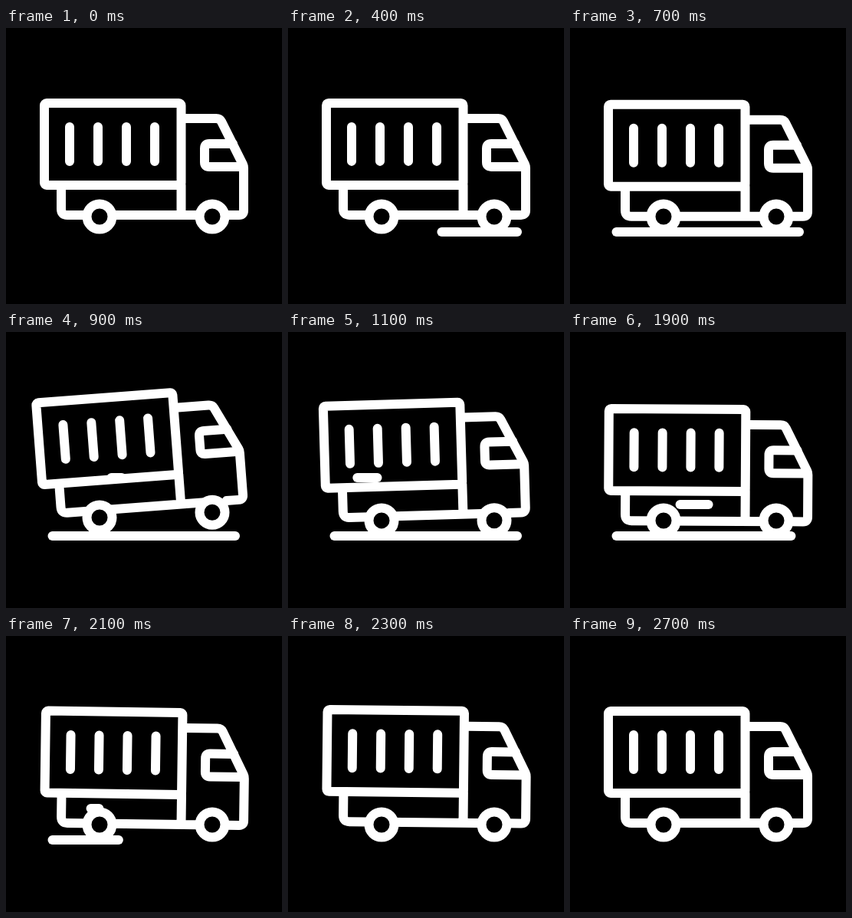
Write an HTML page that moves like this. It is 360x360 px and loops after 3 s.

```html
<!DOCTYPE html>
<html lang="en">
<head>
<meta charset="utf-8">
<title>Delivery truck</title>
<style>
  html, body { margin: 0; width: 100%; height: 100%; overflow: hidden; background: #000; }
  svg { display: block; width: 100vw; height: 100vh; }
  rect, path, circle, line {
    fill: none; stroke: #fff; stroke-width: 12;
    stroke-linecap: round; stroke-linejoin: round;
  }
  circle { fill: #000; }
</style>
</head>
<body>
<svg viewBox="0 0 360 360">
  <line id="road" y1="266" y2="266"/>
  <g id="winds"></g>
  <g id="body">
    <rect x="50" y="98" width="178.5" height="107" rx="3"/>
    <path d="M83 129V174M120 129V174M157 129V174M194 129V174"/>
    <path d="M72 208V236Q72 244 80 244H269M228.5 205V244"/>
    <path d="M231 118H274Q279 118 281 122L309 178Q310 180 310 183V238Q310 244 304 244H288"/>
    <path d="M296 151H265Q259 151 259 157V175Q259 181 265 181H309"/>
  </g>
  <circle id="rear" cx="122" cy="246" r="16.5"/>
  <circle id="front" cx="269" cy="246" r="16.5"/>
</svg>
<script>
const LOOP = 3000, STEP = 100, LAST = 2700;
const WIND_TIME = 640, WIND_LAG = 104;
const $ = id => document.getElementById(id);

const winds = [
  { y: 190, from: 155, reach: 90, start: 700 },
  { y: 135, from: 311, reach: 130, start: 1150 },
  { y: 225, from: 240, reach: 130, start: 1490 }
];

const clamp = p => Math.min(1, Math.max(0, p));
const ease = p => p < 0.5 ? 2 * p * p : 1 - 2 * (1 - p) * (1 - p);
const travel = (t, start, time) => ease(clamp((t - start) / time));
// Rises from 0 to 1 and falls back to 0.
const pulse = (t, start, end) => Math.sin(Math.PI * clamp((t - start) / (end - start))) ** 2;

for (const wind of winds) {
  wind.el = document.createElementNS("http://www.w3.org/2000/svg", "line");
  wind.el.setAttribute("y1", wind.y);
  wind.el.setAttribute("y2", wind.y);
  $("winds").append(wind.el);
}

// Shows the part of a line between its leading and trailing end.
function trim(el, from, reach, head, tail) {
  el.setAttribute("x1", from - reach * tail);
  el.setAttribute("x2", from - reach * head);
  el.style.display = head - tail > 0.001 ? "" : "none";
}

function draw(t) {
  const engine = clamp(Math.min(t, LAST - t) / 300);
  const shake = engine * (0.5 + 2 * Math.cos(2 * Math.PI * (t / 667 + 0.1)));
  const hop = pulse(t, 700, 1200);
  const tilt = 0.8 * pulse(t, 1700, 2600) - 4.8 * hop;
  $("body").setAttribute("transform",
    `translate(0 ${shake - 11 * hop}) rotate(${tilt} 122 244)`);
  $("rear").setAttribute("cy", 246 - 6 * hop ** 4);
  $("front").setAttribute("cy", 246 - 16 * hop ** 4);

  trim($("road"), 299, 238.5, travel(t, 150, 550), travel(t, 1830, 470));
  for (const { el, from, reach, start } of winds) {
    trim(el, from, reach, travel(t, start, WIND_TIME), travel(t, start + WIND_LAG, WIND_TIME));
  }
}

const begin = performance.now();
function tick() {
  const t = (performance.now() - begin) % LOOP;
  draw(Math.min(LAST, Math.floor(t / STEP) * STEP));
  requestAnimationFrame(tick);
}
tick();
</script>
</body>
</html>
```
